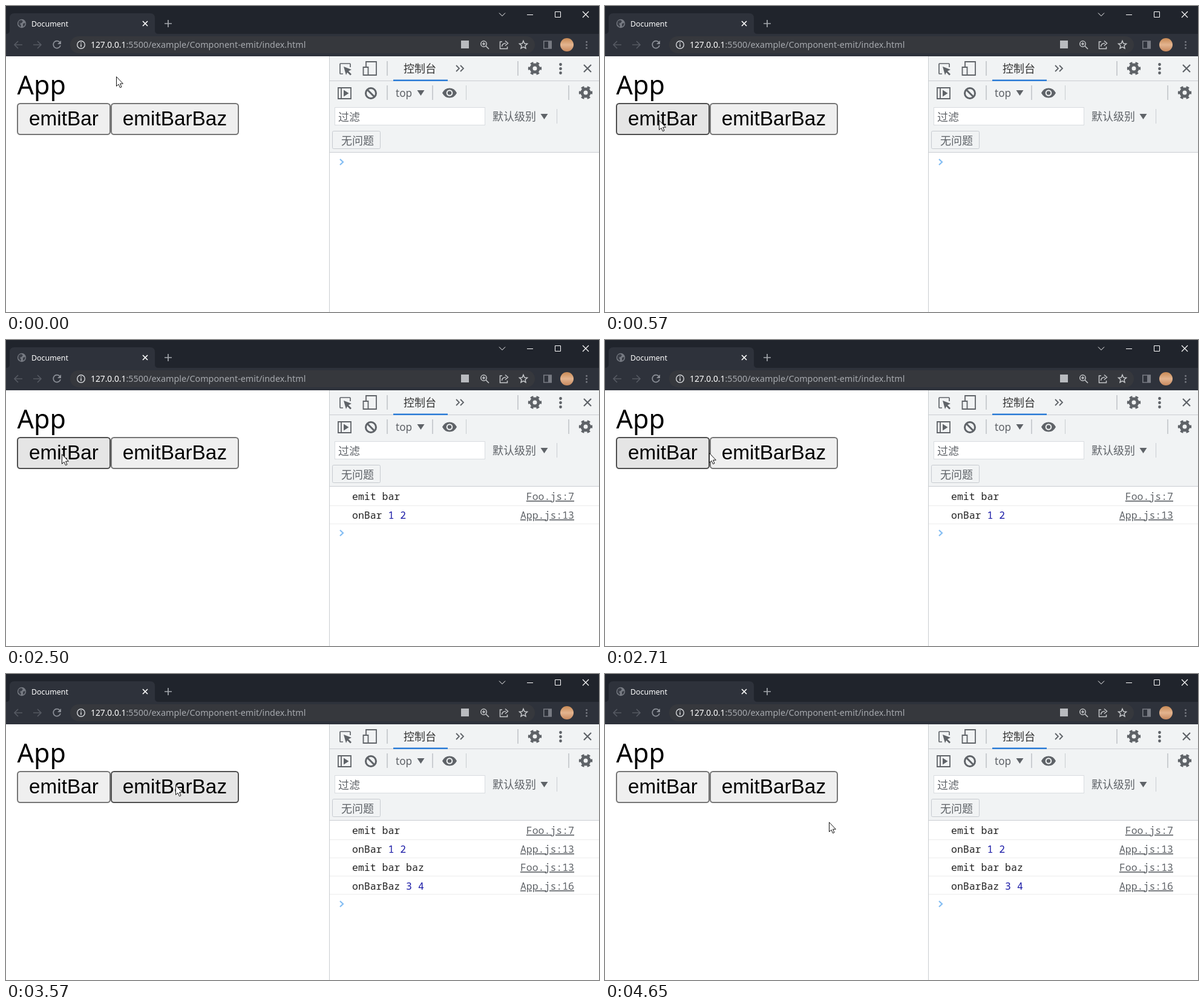
These frames come from a looping animation (980x505 px, 4.68 s). An HTML page:

```html
<!DOCTYPE html>
<html lang="zh-CN">
<head>
<meta charset="utf-8">
<title>Document</title>
<style>
  html, body { margin: 0; width: 100%; height: 100%; overflow: hidden; background: #fff; }
  svg { display: block; width: 980px; height: 505px; }
  text { white-space: pre; }
  .line { fill: none; stroke: currentColor; }
  .solid { fill: currentColor; stroke: none; }
  .ui { font: 17.2px "Noto Sans", sans-serif; }
  .zh { font: 18px "Noto Sans CJK SC", "Noto Sans CJK", sans-serif; fill: #5f6368; }
  .console { font: 16.5px "Noto Sans Mono", monospace; fill: #222; }
  .console .num { fill: #1a1aa6; }
  .console .link { fill: #5f6368; text-decoration: underline; text-anchor: end; }
  .button text { font: 33.33px "Liberation Sans", Arial, sans-serif; fill: #000; }
  .button rect { fill: #efefef; stroke: #767676; stroke-width: 2; }
  .button.hover rect { fill: #e5e5e5; stroke: #4f4f4f; }
  .button.press rect { fill: #f5f5f5; stroke: #8d8d8d; }
</style>
</head>
<body>
<svg viewBox="0 0 980 505">
  <defs>
    <g id="gear" class="line">
      <circle r="6" stroke-width="5"/>
      <circle r="9" stroke-width="4.4" pathLength="12" stroke-dasharray="1" stroke-dashoffset=".5"/>
    </g>
    <path id="cross" class="line" d="M-1-1 1 1M1-1-1 1" vector-effect="non-scaling-stroke"/>
    <path id="down" class="solid" d="M-6-4.5H6L0 4.5Z"/>
    <path id="arrow" class="line" d="M7 0H-6M0-6-6 0 0 6"/>
    <linearGradient id="photo" x2="0" y2="1">
      <stop stop-color="#c98a55"/><stop offset=".5" stop-color="#e3b48f"/><stop offset="1" stop-color="#c7895f"/>
    </linearGradient>
  </defs>

  <!-- Browser frame -->
  <rect width="980" height="46" fill="#20242c"/>
  <rect y="46" width="980" height="37" fill="#2e323b"/>
  <path d="M0 46Q6 46 6 40V20Q6 12 14 12H238Q246 12 246 20V40Q246 46 252 46Z" fill="#2e323b"/>
  <circle cx="26" cy="29" r="7.2" fill="#777b83"/>
  <path d="M21 25 25 23 28 25 26 28 23 29 25 32 24 35 20 30ZM28 29 32 28 31 32 28 34Z" fill="#393d46"/>
  <text x="42" y="34" class="ui" style="font-size:12.4px" fill="#fff">Document</text>
  <g color="#fff">
    <use href="#cross" transform="translate(230 29) scale(4)" stroke-width="1.7"/>
    <path class="line" d="M815 11.5 820 16.5 825 11.5"/>
    <path class="line" d="M861 14.5H871M907.5 9.5H916.5V18.5H907.5Z"/>
    <use href="#cross" transform="translate(958 14) scale(5)" stroke-width="1.2"/>
  </g>
  <path class="line" color="#a3a6ac" stroke-width="1.7" d="M262 29H274M268 23V35"/>

  <!-- Address bar -->
  <rect x="106" y="50" width="768" height="28" rx="14" fill="#36383d"/>
  <g color="#555962" stroke-width="1.7">
    <use href="#arrow" x="20" y="64"/>
    <use href="#arrow" transform="translate(52 64) scale(-1 1)"/>
  </g>
  <g color="#8c9098">
    <path class="line" stroke-width="1.7" d="M89 60A6 6 0 1 0 90 65"/>
    <path class="solid" d="M91 57V63H85Z"/>
  </g>
  <g color="#d5d7da">
    <circle class="line" cx="124" cy="64" r="6.3" stroke-width="1.4"/>
    <path class="line" stroke-width="1.6" d="M124 63V67.5M124 60V61.7"/>
  </g>
  <text x="140" y="69" class="ui" style="font-size:13.8px" fill="#fff">127.0.0.1</text>
  <text x="198.5" y="69" class="ui" style="font-size:14.37px" fill="#a6a9ae">:5500/example/Component-emit/index.html</text>
  <rect x="752" y="57" width="13" height="13" fill="#b9bbbf"/>
  <g class="line" color="#c5c7ca" stroke-width="1.5">
    <circle cx="789.5" cy="62.5" r="4.7"/>
    <path d="M793 66 798 71M787 62.5H792M789.5 60V65"/>
    <path d="M820 59H816.5V70.5H828.5V67M819.5 67Q820 61.5 826 61.5M825 57.5 829.5 61.5 825 65.5"/>
    <path d="M855 57.5 856.9 62 861.5 62.3 858 65.4 859 70 855 67.6 851 70 852 65.4 848.5 62.3 853.1 62Z"/>
  </g>
  <g color="#777a82">
    <path class="line" stroke-width="1.6" d="M888.8 58H901.2V70H888.8Z"/>
    <path class="solid" d="M896 58H901V70H896Z"/>
    <path class="line" stroke-width="3" stroke-linecap="round" d="M959.5 59.3v0M959.5 64.3v0M959.5 69.3v0"/>
  </g>
  <circle cx="927" cy="64" r="11" fill="url(#photo)"/>

  <!-- Page -->
  <text x="18.5" y="146" style="font:43px 'Noto Sans',sans-serif">App</text>
  <g class="button" id="bar">
    <rect x="19" y="161" width="153" height="51" rx="4.5"/><text x="38" y="197">emitBar</text>
  </g>
  <g class="button" id="barBaz">
    <rect x="174" y="161" width="210" height="51" rx="4.5"/><text x="192.8" y="197">emitBarBaz</text>
  </g>

  <!-- Developer tools -->
  <rect x="535" y="83" width="445" height="158" fill="#f1f3f4"/>
  <path class="line" color="#cacdd1" d="M534.5 83V505M535 123.5H980M535 241.5H980M760.5 131V155M910.5 170V194"/>
  <path class="line" color="#cacdd1" stroke-width="2" d="M630 91V115M846 91V115M630 131V155M705 131V155M930 131V155"/>
  <rect x="640" y="121.5" width="90" height="2.5" fill="#2a7bd6"/>
  <g color="#5f6368">
    <path class="line" stroke-width="1.7" d="M569 101V96Q569 95 568 95H553Q552 95 552 96V111Q552 112 553 112H557"/>
    <path class="solid" d="M558 100 571 105 566 107.5 571 112.5 569 114.5 564 109.5 562 114Z"/>
    <path class="line" stroke-width="1.8" d="M595 101V92H612V114H599M590.5 101H598.5V114H590.5Z"/>
    <path class="line" stroke-width="1.8" d="M744 98 749 103 744 108M751 98 756 103 751 108"/>
    <use href="#gear" x="874" y="103"/>
    <use href="#gear" x="958" y="143"/>
    <path class="line" stroke-width="4.8" stroke-linecap="round" d="M916.5 96.5v0M916.5 103.5v0M916.5 110.5v0"/>
    <use href="#cross" transform="translate(961 103) scale(6)" stroke-width="2.2"/>
    <path class="line" stroke-width="1.8" d="M549 135H570V153H549ZM554 135V153"/>
    <path class="solid" d="M558 138.5 566.5 144 558 149.5Z"/>
    <g class="line" stroke-width="3"><circle cx="603" cy="144" r="8.5"/><path d="M597 138 609 150"/></g>
    <use href="#down" x="685.5" y="143.5"/>
    <use href="#down" x="889.5" y="182.5"/>
    <path class="solid" d="M721 143.5Q725 135.5 733 135.5T745 143.5Q741 151.5 733 151.5T721 143.5Z"/>
    <circle cx="733" cy="143.5" r="4.3" fill="#5f6368" stroke="#f1f3f4" stroke-width="2"/>
  </g>
  <text class="zh" x="657" y="110" style="fill:#333">控制台</text>
  <text class="ui" x="644" y="150" fill="#5f6368">top</text>
  <rect x="543.5" y="167.5" width="248" height="29" fill="#fff" stroke="#d9dce0"/>
  <text class="zh" x="549" y="190">过滤</text>
  <text class="zh" x="804" y="189">默认级别</text>
  <rect x="539.5" y="206.5" width="79" height="29" rx="2" fill="#f1f3f4" stroke="#c6cacf"/>
  <text class="zh" x="554" y="228.5">无问题</text>
  <g id="log" class="console"></g>
  <path id="prompt" class="line" color="#83bdf3" stroke-width="2.2" d="M552-4.7 557 0 552 4.7"/>

  <path id="cursor" fill="#fff" stroke="#111" d="M.5.7V16.4L4 13.2 6.5 18.7 9 17.6 6.6 12.2H11.4Z"/>
</svg>
<script>
  const LOOP = 4680;
  const byId = id => document.getElementById(id);
  const smooth = u => u * u * (3 - 2 * u);

  const buttons = [
    { node: byId('bar'), left: 18, right: 173, press: 980, release: 1080 },
    { node: byId('barBaz'), left: 173, right: 385, press: 3330, release: 3460 }
  ];

  const entries = [
    ['emit bar', '', 'Foo.js:7'],
    ['onBar ', '1 2', 'App.js:13'],
    ['emit bar baz', '', 'Foo.js:13'],
    ['onBarBaz ', '3 4', 'App.js:16']
  ];
  byId('log').innerHTML = entries.map(([label, numbers, link], i) => {
    const y = Math.round(264 + i * 30.6);
    return `<g><text x="572" y="${y}">${label}<tspan class="num">${numbers}</tspan></text>
      <text class="link" x="939" y="${y}">${link}</text>
      <path class="line" color="#ececec" d="M535 ${273.5 + i * 30}H980"/></g>`;
  }).join('');
  const rows = [...byId('log').children];

  const moves = [
    { start: 0, end: 570, from: [182, 116], to: [89, 188], ease: smooth },
    { start: 2450, end: 3000, from: [89, 188], to: [281, 183], ease: smooth },
    { start: 3330, end: 3570, from: [281, 183], to: [280, 183], ease: smooth },
    { start: 4470, end: 4650, from: [280, 183], to: [370, 244], ease: u => u ** 1.7 }
  ];

  function cursorAt(time) {
    const t = Math.floor(time / 30) * 30; // the pointer is sampled every 30 ms
    const { start, end, from, to, ease } = moves.findLast(move => t >= move.start);
    const k = ease(Math.min(1, (t - start) / (end - start)));
    return from.map((v, i) => Math.round(v + (to[i] - v) * k));
  }

  function draw(t) {
    const [x, y] = cursorAt(t);
    byId('cursor').setAttribute('transform', `translate(${x} ${y})`);

    for (const b of buttons) {
      const over = x >= b.left && x < b.right && y >= 160 && y < 213;
      b.node.classList.toggle('hover', over);
      b.node.classList.toggle('press', over && t >= b.press && t < b.release);
    }

    const count = 2 * buttons.filter(b => t >= b.release).length;
    rows.forEach((row, i) => row.style.display = i < count ? '' : 'none');
    byId('prompt').setAttribute('transform', `translate(0 ${257.5 + count * 30.5})`);
  }

  function tick() {
    draw(performance.now() % LOOP);
    requestAnimationFrame(tick);
  }
  tick();
</script>
</body>
</html>
```
